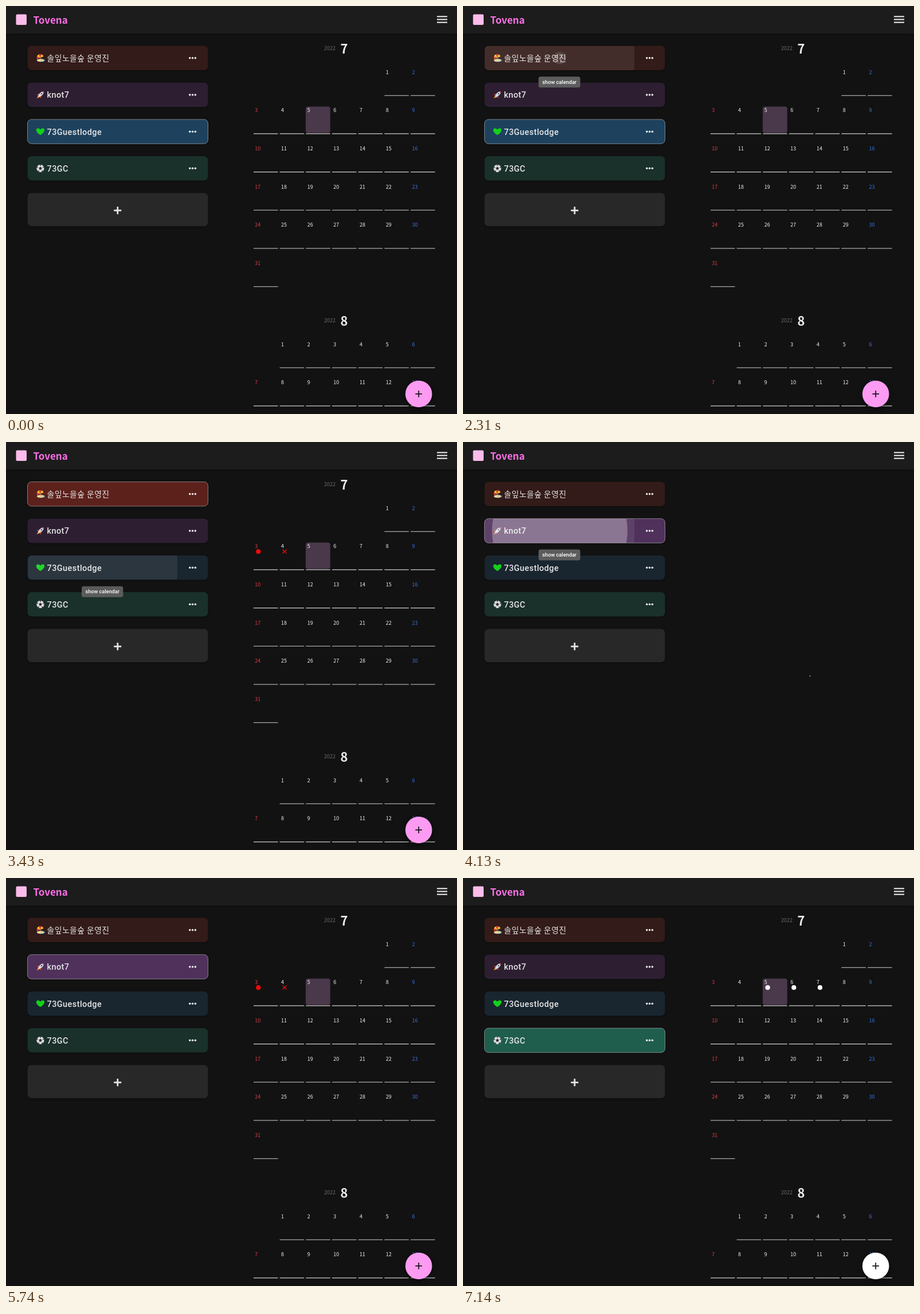
Animation of 787x712 px, one loop 8 s. Source, as an HTML page with a canvas:

```html
<!DOCTYPE html>
<html lang="ko">
<head>
<meta charset="utf-8">
<title>Calendar groups</title>
<style>
html, body { margin: 0; width: 787px; height: 712px; overflow: hidden; background: #121212; }
canvas { display: block; width: 787px; height: 712px; }
</style>
</head>
<body>
<canvas id="stage"></canvas>
<script>
const W = 787, H = 712, LOOP = 8000, STEP = 70;
const SANS = '"Noto Sans CJK KR", "Noto Sans CJK", "Noto Sans", sans-serif';
const ROBOTO = 'Roboto, "Noto Sans CJK KR", sans-serif';
const canvas = document.getElementById('stage');
const ctx = canvas.getContext('2d');
const dpr = window.devicePixelRatio || 1;
canvas.width = W * dpr;
canvas.height = H * dpr;

const groups = [
  { name: '솔잎노을숲 운영진', off: '#331b19', on: '#5d211c', icon: beach, font: '400 13.9px ' + SANS },
  { name: 'knot7', off: '#2d1f31', on: '#4f315c', icon: rocket },
  { name: '73Guestlodge', off: '#19252f', on: '#1e425e', icon: heart },
  { name: '73GC', off: '#1a302a', on: '#1f5d4d', icon: ball }
];
const CARD = { x: 37.5, y: 69.5, w: 315, h: 42.5, gap: 64.2, split: 299 };

// pointer visits, in ms
const visits = [
  { i: 2, enter: 1060, leave: 1800, press: 1115, release: 1430, flat: true },
  { i: 0, enter: 2010, leave: 2880, press: 2220, release: 2530 },
  { i: 2, enter: 3210, leave: 3430 },
  { i: 1, enter: 3450, leave: 4840, press: 3793, release: 4110 },
  { i: 3, enter: 5760, leave: 6860, press: 6180, release: 6490 }
];
const picks = [{ at: 0, i: 2 }, { at: 2590, i: 0 }, { at: 4130, i: 1 }, { at: 6510, i: 3 }];
const LOAD = 210;

const clamp = v => Math.max(0, Math.min(1, v));

// cubic-bezier(.4, 0, .2, 1)
function ease(v) {
  const x = clamp(v);
  let lo = 0, hi = 1, s = x;
  for (let k = 0; k < 18; k++) {
    s = (lo + hi) / 2;
    const bx = 1.2 * s * (1 - s) ** 2 + 0.6 * s * s * (1 - s) + s ** 3;
    if (bx < x) lo = s; else hi = s;
  }
  return 3 * s * s - 2 * s ** 3;
}

function box(x, y, w, h, r, fill) {
  ctx.beginPath();
  ctx.roundRect(x, y, w, h, r);
  if (fill) { ctx.fillStyle = fill; ctx.fill(); }
}

function dot(x, y, r, fill) {
  ctx.beginPath();
  ctx.arc(x, y, r, 0, Math.PI * 2);
  ctx.fillStyle = fill;
  ctx.fill();
}

function line(x1, y1, x2, y2, color, width) {
  ctx.beginPath();
  ctx.moveTo(x1, y1);
  ctx.lineTo(x2, y2);
  ctx.strokeStyle = color;
  ctx.lineWidth = width;
  ctx.stroke();
}

function shape(points, fill) {
  ctx.beginPath();
  points.forEach(([x, y]) => ctx.lineTo(x, y));
  ctx.closePath();
  ctx.fillStyle = fill;
  ctx.fill();
}

function text(str, x, y, font, fill, spacing = 0, align = 'left') {
  ctx.font = font;
  ctx.letterSpacing = spacing + 'px';
  ctx.textAlign = align;
  ctx.fillStyle = fill;
  ctx.fillText(str, x, y);
}

function plus(x, y, size, width, color) {
  line(x - size, y, x + size, y, color, width);
  line(x, y - size, x, y + size, color, width);
}

function shadow(color, blur, dy) {
  ctx.shadowColor = color;
  ctx.shadowBlur = blur * dpr;
  ctx.shadowOffsetY = dy * dpr;
}

// small icons drawn around 0,0
function ellipse(x, y, rx, ry, fill) {
  ctx.beginPath();
  ctx.ellipse(x, y, rx, ry, 0, 0, Math.PI * 2);
  ctx.fillStyle = fill;
  ctx.fill();
}

function beach() {
  ellipse(1, 4.2, 6.8, 2.6, '#4bb3d8');
  ellipse(0, 4, 6, 2.3, '#f2d597');
  line(-1, -2, 2, 5, '#c9a06a', 1);
  ctx.save();
  ctx.rotate(-0.4);
  ['#e8402f', '#f7c93c', '#e8402f', '#f7c93c'].forEach((c, k) => {
    const a = Math.PI * (1 + k / 4);
    ctx.beginPath();
    ctx.moveTo(0, -0.5);
    ctx.arc(0, -0.5, 6.2, a, a + Math.PI / 4);
    ctx.fillStyle = c;
    ctx.fill();
  });
  ctx.restore();
}

function rocket() {
  ctx.save();
  ctx.rotate(Math.PI / 4);
  shape([[-2, 3], [0, 9], [2, 3]], '#f6a52c');
  shape([[-2, -1], [-5, 4], [-2, 4]], '#d33b32');
  shape([[2, -1], [5, 4], [2, 4]], '#d33b32');
  ellipse(0, -1.5, 2.7, 6.2, '#d5d9df');
  shape([[-1.7, -6], [0, -9], [1.7, -6]], '#d33b32');
  dot(0, -2.7, 1.3, '#3d5a78');
  ctx.restore();
}

function heart() {
  ctx.beginPath();
  ctx.moveTo(0, 6);
  ctx.bezierCurveTo(-13, -2, -5.5, -9.5, 0, -3.6);
  ctx.bezierCurveTo(5.5, -9.5, 13, -2, 0, 6);
  ctx.fillStyle = '#14cf1c';
  ctx.fill();
}

function ball() {
  dot(0, 0, 6.6, '#dcdcdc');
  const at = (r, k) => [r * Math.sin(k * Math.PI * 0.4), -r * Math.cos(k * Math.PI * 0.4)];
  const ring = [0, 1, 2, 3, 4];
  shape(ring.map(k => at(2.7, k)), '#2c2c2c');
  ring.forEach(k => {
    line(...at(2.7, k), ...at(5.4, k), '#888', 0.6);
    dot(...at(5.8, k), 1.1, '#3a3a3a');
  });
}

function header() {
  ctx.save();
  shadow('rgba(0,0,0,.35)', 4, 1);
  box(0, 0, W, 48, 0, '#1c1c1c');
  ctx.restore();
  box(17.5, 14.5, 18.5, 18.5, 2, '#fbbcea');
  text('Tovena', 47.5, 31, '700 17px ' + SANS, '#fb6fe6');
  [18.4, 23.5, 28.6].forEach(y => line(752, y, 770, y, '#f2f2f2', 2));
}

function feedback(i, y, t) {
  ctx.save();
  box(CARD.x, y, CARD.w, CARD.h, 7);
  ctx.clip();
  box(CARD.x, y, CARD.split - CARD.x, CARD.h, [7, 3, 3, 7]);
  ctx.clip();
  for (const v of visits) {
    if (v.i !== i) continue;
    if (!v.flat) {
      const hover = 0.08 * ease((t - v.enter) / 250) * (1 - ease((t - v.leave) / 250));
      ctx.fillStyle = `rgba(255,255,255,${hover})`;
      ctx.fillRect(CARD.x, y, CARD.split - CARD.x, CARD.h);
    }
    if (v.press && t > v.press) {
      const grow = ease((t - v.press) / 550);
      const alpha = (0.1 + 0.2 * grow) * (1 - ease((t - v.release) / 550));
      if (alpha > 0.002) dot(168.8, y + CARD.h / 2, 133.5 * grow, `rgba(255,255,255,${alpha})`);
    }
  }
  ctx.restore();
}

function card(g, i, selected, t) {
  const y = CARD.y + i * CARD.gap, mid = y + CARD.h / 2;
  ctx.save();
  shadow('rgba(0,0,0,.4)', 3, 1);
  box(CARD.x, y, CARD.w, CARD.h, 7, selected ? g.on : g.off);
  ctx.restore();
  ctx.save();
  ctx.translate(60, mid);
  g.icon();
  ctx.restore();
  text(g.name, 71.5, mid + 5.4, g.font || '500 14.5px ' + ROBOTO, '#e6e6e6', 0.41);
  [-4.8, 0, 4.8].forEach(d => dot(325.6 + d, mid, 1.75, '#f0f0f0'));
  feedback(i, y, t);
  if (selected) {
    box(CARD.x, y, CARD.w, CARD.h, 7);
    ctx.strokeStyle = 'rgba(255,255,255,.42)';
    ctx.lineWidth = 1;
    ctx.stroke();
  }
}

function tooltip(v, t) {
  const k = ease((t - v.enter - 100) / 150) * (1 - ease((t - v.leave - 20) / 150));
  if (k < 0.01) return;
  ctx.save();
  ctx.globalAlpha = k;
  ctx.translate(168.2, CARD.y + v.i * CARD.gap + 63.3);
  ctx.scale(0.75 + 0.25 * k, 0.75 + 0.25 * k);
  box(-36.4, -9.5, 72.8, 19, 3.5, 'rgba(97,97,97,.94)');
  text('show calendar', 0, 3.3, '500 9.2px ' + ROBOTO, '#fff', 0, 'center');
  ctx.restore();
}

const colX = c => 432 + c * 45.68;

function month(num, top, first, days) {
  text('2022', 575, top + 3.4, '400 9px ' + SANS, '#6c6c6c', 0, 'right');
  text(num, 590, top + 9, '700 22px ' + SANS, '#ececec', 0, 'center');
  for (let d = 1; d <= days; d++) {
    const c = (first + d - 1) % 7, row = Math.floor((first + d - 1) / 7);
    const x = colX(c), y = top + 82.2 + row * 66.7;
    if (y > H + 60) break;
    if (num === '7' && d === 5) box(x - 0.4, y - 47.4, 42.8, 46, 4, '#4a384b');
    const color = c === 0 ? '#d93f4b' : c === 6 ? '#3b72e0' : '#f0f0f0';
    text(String(d), x + 2.3, y - 37.6, '500 9px ' + SANS, color);
    line(x, y, x + 42.5, y, '#cfcfcf', 1.1);
  }
}

function marks(sel) {
  const y = 191.2;
  if (sel < 2) {
    dot(colX(0) + 8.3, y, 4.1, '#f00a0a');
    const x = colX(1) + 8.4;
    line(x - 3.4, y - 3.4, x + 3.4, y + 3.4, '#f00a0a', 1.4);
    line(x + 3.4, y - 3.4, x - 3.4, y + 3.4, '#f00a0a', 1.4);
  } else if (sel === 3) {
    [2, 3, 4].forEach(c => dot(colX(c) + 8.3, y, 4.1, '#fff'));
  }
}

function calendar(sel) {
  month('7', 74, 5, 31);
  month('8', 549, 1, 31);
  marks(sel);
  ctx.save();
  shadow('rgba(0,0,0,.5)', 8, 3);
  dot(720.2, 677, 23.3, sel === 3 ? '#fff' : '#fc9bf1');
  ctx.restore();
  plus(720.2, 677, 5.8, 1.7, '#111');
}

function spinner(age) {
  const a = 0.49 + age / 1400 * Math.PI * 2;
  const at = r => [590 + r * Math.cos(a), 400 + r * Math.sin(a)];
  line(...at(16.2), ...at(19.2), '#c8c8c8', 1);
}

function draw(t) {
  ctx.setTransform(dpr, 0, 0, dpr, 0, 0);
  ctx.fillStyle = '#121212';
  ctx.fillRect(0, 0, W, H);
  const pick = picks.filter(p => p.at <= t).pop();
  const age = t - pick.at;
  if (pick.at && age < LOAD) spinner(age);
  else calendar(pick.i);
  header();
  groups.forEach((g, i) => card(g, i, i === pick.i, t));
  ctx.save();
  shadow('rgba(0,0,0,.4)', 3, 1);
  box(CARD.x, 326.2, CARD.w, 58, 7, '#282828');
  ctx.restore();
  plus(194.8, 356.8, 6.5, 2.8, '#e4e4e4');
  visits.forEach(v => tooltip(v, t));
}

const start = performance.now();
function tick() {
  const t = (performance.now() - start) % LOOP;
  draw(Math.floor(t / STEP) * STEP);
  requestAnimationFrame(tick);
}
tick();
</script>
</body>
</html>
```
